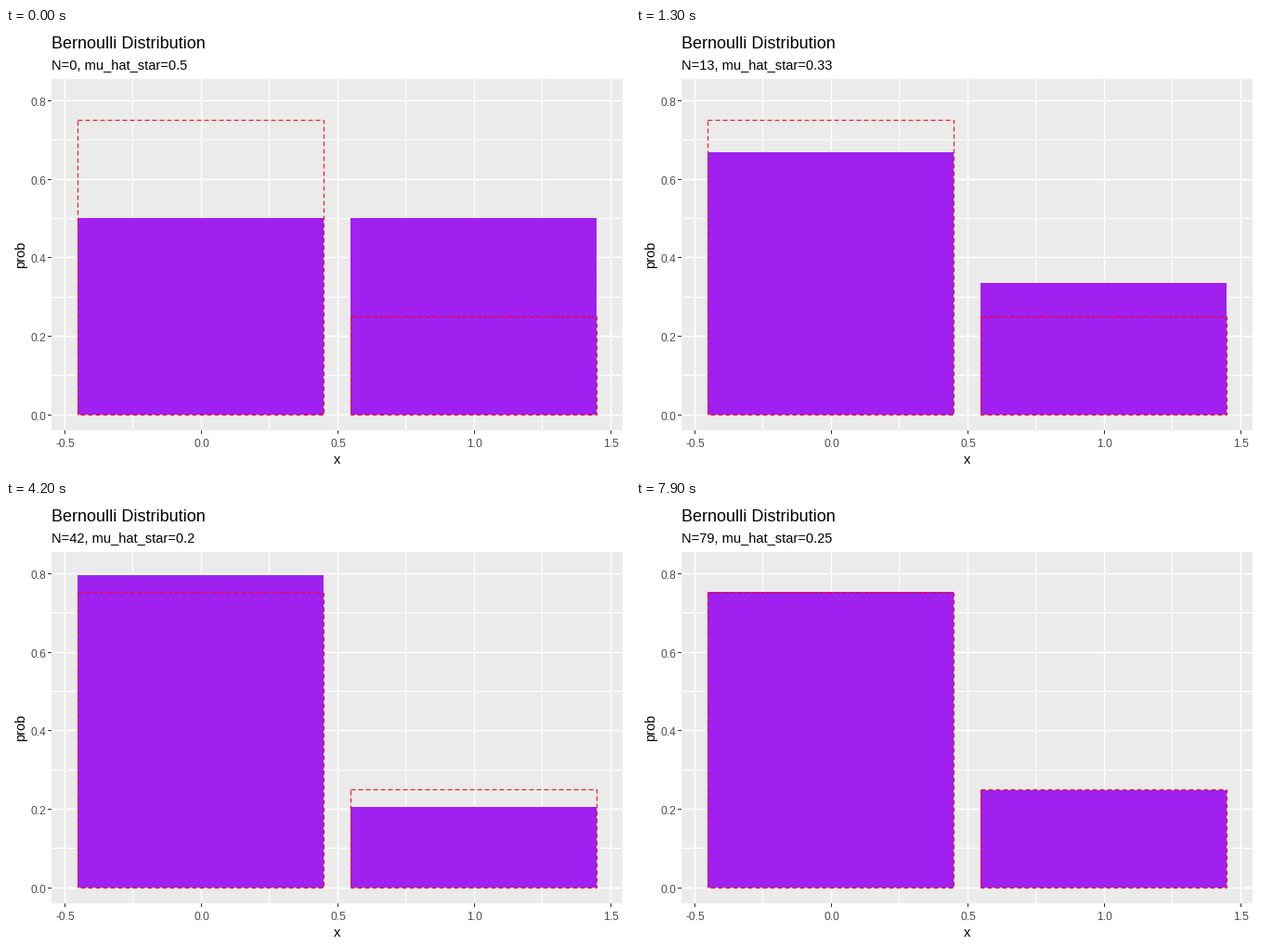
A matplotlib script that plays this animation: 672x480 px, repeating every 8000 ms.

```python
import matplotlib.pyplot as plt
import numpy as np
from matplotlib.animation import FuncAnimation
from matplotlib.patches import Rectangle

W, H, DPI = 672, 480, 96
PX = 72 / DPI  # one pixel in points
STEPS = 80
TRUE_MU = 0.25
# trials that came up 1
HITS = np.array([2, 4, 7, 13, 19, 22, 26, 42, 44, 46,
                 49, 52, 56, 59, 62, 66, 69, 71, 75])
LEFT, TOP, RIGHT, BOTTOM = 49, 55, 664, 434

plt.rcParams["font.family"] = "Liberation Sans"
fig = plt.figure(figsize=(W / DPI, H / DPI), dpi=DPI, facecolor="white")
ax = fig.add_axes([0, 0, 1, 1])
ax.set_xlim(0, W)
ax.set_ylim(H, 0)
ax.axis("off")


def px(x):
    return int(np.floor(49.8 + (x + 0.545) * 294.2))


def py(y):
    return int(np.floor(417.05 - 423.3 * y))


def box(x0, y0, x1, y1, color, z):
    return ax.add_patch(Rectangle((x0, y0), x1 - x0, y1 - y0, fc=color,
                                  lw=0, antialiased=False, zorder=z))


def line(x0, y0, x1, y1, color, z, width=1.0, ls="-"):
    ax.plot([x0, x1], [y0, y1], color=color, lw=width * PX, ls=ls, zorder=z,
            snap=False, solid_capstyle="butt", dash_capstyle="butt")


def label(x, y, s, size, color="black", va="baseline", **kw):
    return ax.text(x, y, s, fontsize=size * PX, color=color, va=va, **kw)


def draw_panel():
    box(LEFT, TOP, RIGHT, BOTTOM, "#EBEBEB", 0)
    for i, x in enumerate(np.arange(-0.5, 1.51, 0.25)):
        major = i % 2 == 0
        c = px(x) + 0.5
        line(c, TOP, c, BOTTOM, "white", 1, 1.42 if major else 1)
        if major:
            line(c, BOTTOM, c, BOTTOM + 4, "#333333", 1)
            label(c, 452, f"{x:.1f}", 12, "#4D4D4D", ha="center")
    for i in range(9):
        major = i % 2 == 0
        c = py(i / 10) + 0.5
        line(LEFT, c, RIGHT, c, "white", 1, 1.42 if major else 1)
        if major:
            line(LEFT - 4, c, LEFT, c, "#333333", 1)
            label(43, c + 5.5, f"{i / 10:.1f}", 12, "#4D4D4D", ha="right")
    label(49, 22, "Bernoulli Distribution", 18)
    label(357, 470, "x", 14.67, ha="center")
    label(23.5, 244, "prob", 14.67, ha="right", va="center", rotation=90)


def dashed_outline(x0, x1, prob):
    """Dashes run clockwise from the top left corner."""
    y0, y1 = py(prob), py(0)
    pts = np.array([(x0, y0), (x1, y0), (x1, y1), (x0, y1), (x0, y0)])
    run = 0
    for a, b in zip(pts[:-1], pts[1:]):
        line(*(a + 0.5), *(b + 0.5), "red", 3, ls=(run % 8, (5, 3)))
        run += abs(b - a).sum()


draw_panel()
subtitle = label(49, 44, "", 14.67)
bars = []
for center, prob in ((0, 1 - TRUE_MU), (1, TRUE_MU)):
    x0, x1 = px(center - 0.45), px(center + 0.45)
    bars.append(box(x0, py(0.5), x1, py(0), "#A020F0", 2))
    dashed_outline(x0, x1, prob)


def update(n):
    mu = (1 + np.count_nonzero(HITS <= n)) / (2 + n)
    subtitle.set_text(f"N={n}, mu_hat_star={round(mu, 2):g}")
    for bar, prob in zip(bars, (1 - mu, mu)):
        bar.set_y(py(prob))
        bar.set_height(py(0) - py(prob))
    return [subtitle, *bars]


anim = FuncAnimation(fig, update, frames=STEPS, interval=100,
                     repeat=True, repeat_delay=0, blit=False)
plt.show()
```
